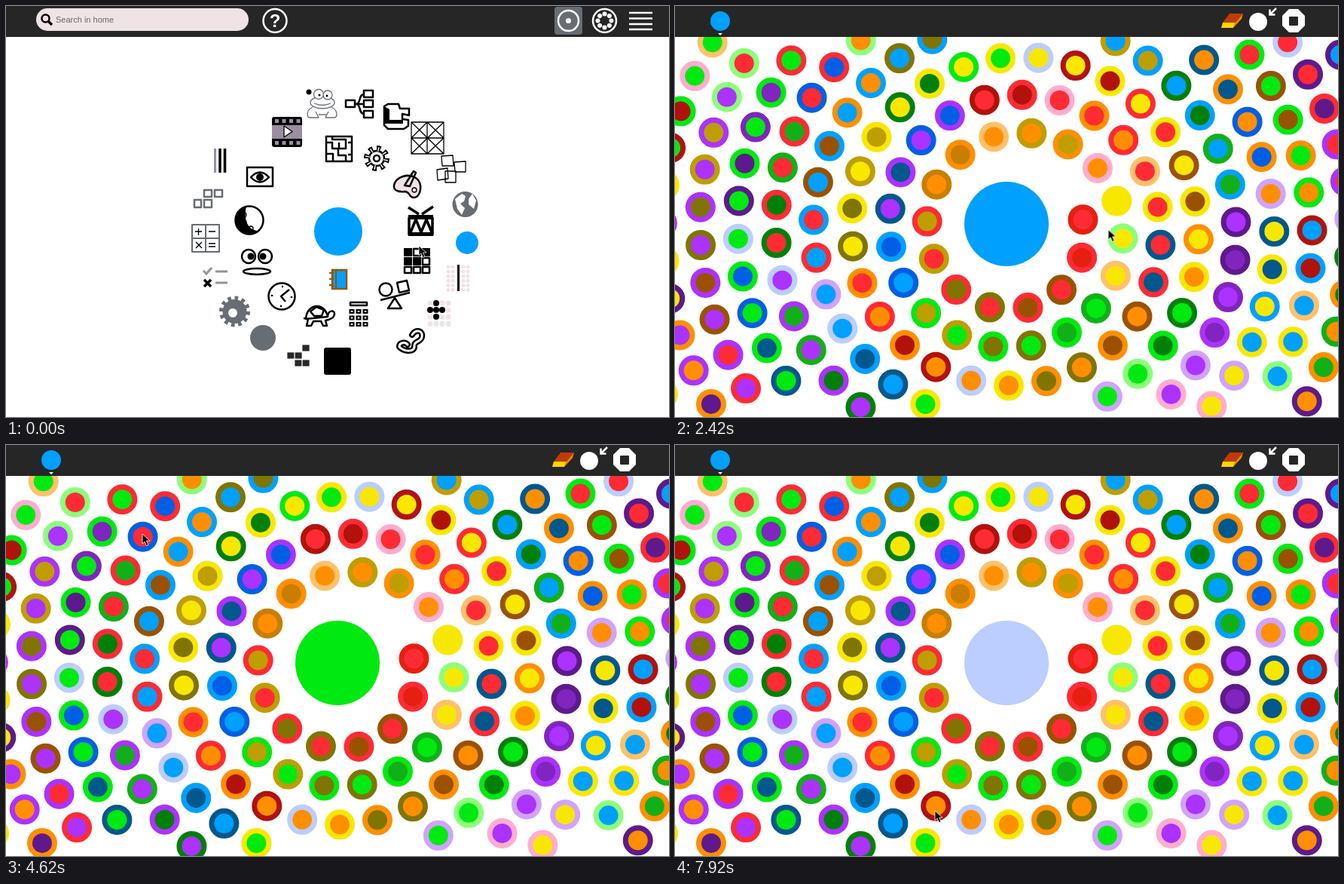
An HTML page without scripts for the animation above (8000 ms loop, 880 by 545 pixels).

```html
<!DOCTYPE html>
<html lang="en">
<head>
<meta charset="utf-8">
<title>Colour spiral</title>
<style>
html, body { margin: 0; width: 100%; height: 100%; overflow: hidden; background: #fff; }
body { position: relative; font-family: "Liberation Sans", Arial, sans-serif; }
svg, .dots { position: absolute; left: 0; top: 0; width: 880px; height: 545px; overflow: hidden; }
p { margin: 0; }

/* Dots sit at equal steps along a spiral */
.dots i {
  --n: calc(var(--s) + var(--k, 0));
  --u: sqrt(122.9 + 12.467 * var(--n) + .00012 * var(--n) * var(--n));
  --a: calc((var(--u) - 11.25) * 1rad);
  --r: calc(var(--u) * 8px + 2px);
  position: absolute; left: 452px; top: 298px;
  width: 26px; height: 26px; margin: -20px;
  border-width: 7px; border-style: solid; border-radius: 50%;
  translate: calc(var(--r) * cos(var(--a))) calc(var(--r) * sin(var(--a)));
}
i:nth-child(2) { --k: 1 }  i:nth-child(3) { --k: 2 }  i:nth-child(4) { --k: 3 }
i:nth-child(5) { --k: 4 }  i:nth-child(6) { --k: 5 }  i:nth-child(7) { --k: 6 }
i:nth-child(8) { --k: 7 }  i:nth-child(9) { --k: 8 }  i:nth-child(10) { --k: 9 }
i:nth-child(11) { --k: 10 } i:nth-child(12) { --k: 11 } i:nth-child(13) { --k: 12 }

/* Upper case: ring, lower case: middle */
.R { border-color: #ff2b34 } .r { background: #ff2b34 }
.M { border-color: #b2120c } .m { background: #b2120c }
.E { border-color: #e62010 } .e { background: #e62010 }
.O { border-color: #ff8f00 } .o { background: #ff8f00 }
.N { border-color: #9a5200 } .n { background: #9a5200 }
.C { border-color: #c97e00 } .c { background: #c97e00 }
.T { border-color: #ffc169 }
.Y { border-color: #f8e800 } .y { background: #f8e800 }
.V { border-color: #807500 } .v { background: #807500 }
.B { border-color: #be9e00 } .b { background: #be9e00 }
.G { border-color: #00ea11 } .g { background: #00ea11 }
.D { border-color: #008009 } .d { background: #008009 }
.H { border-color: #12b018 } .h { background: #12b018 }
.L { border-color: #8bff7a }
.S { border-color: #00a0ff } .s { background: #00a0ff }
.U { border-color: #005fe4 } .u { background: #005fe4 }
.K { border-color: #00588c } .k { background: #00588c }
.P { border-color: #bccdff }
.A { border-color: #ac32ff } .a { background: #ac32ff }
.X { border-color: #5e1a8c } .x { background: #5e1a8c }
.W { border-color: #8224c0 } .w { background: #8224c0 }
.F { border-color: #d1a3ff }
.I { border-color: #ffadce }

.home, .board, .blank, .wait, .pick, .ptr { animation: 8s step-end infinite; }
.home { animation-name: home; }
.board { animation-name: board; }
.blank { animation-name: blank; }
.wait { animation-name: wait; }
.pick { animation-name: pick; }
.ptr { animation-name: ptr; }
.move { animation: move 8s ease-in-out infinite; }
@keyframes home { 0% { visibility: visible } 12.37%, to { visibility: hidden } }
@keyframes board { 0% { visibility: hidden } 19.24%, to { visibility: visible } }
@keyframes blank { 0% { visibility: visible } 19.24%, to { visibility: hidden } }
@keyframes wait { 0% { visibility: visible } 24.7%, to { visibility: hidden } }
@keyframes ptr { 0% { visibility: visible } 12.37% { visibility: hidden } 24.7%, to { visibility: visible } }
@keyframes pick {
  0% { fill: #00a0ff } 41.2% { fill: #e62010 } 57.7% { fill: #00ea11 }
  72.8% { fill: #00a0ff } 89.3%, to { fill: #bccdff }
}
@keyframes move {
  0% { transform: translate(548px, 318px) }
  9%, 12.4% { transform: translate(613px, 314px) }
  12.5%, 24.7% { transform: translate(620px, 315px) }
  35%, 38% { transform: translate(541px, 283px) }
  41.25% { transform: translate(556px, 224px) }
  53%, 55% { transform: translate(129px, 114px) }
  57.75% { transform: translate(181px, 118px) }
  67%, 70% { transform: translate(184px, 284px) }
  72.9% { transform: translate(188px, 324px) }
  84%, 88% { transform: translate(222px, 428px) }
  98%, to { transform: translate(345px, 485px) }
}

.ink { fill: none; stroke: #000; stroke-width: 2.5; stroke-linejoin: round; }
.thin { stroke-width: 1.3; }
.grey { stroke: #686d73; }
.solid { fill: #000; stroke: none; }
.light { fill: none; stroke: #fff; stroke-width: 2.5; }
</style>
</head>
<body>

<div class="dots board">
<p style="--s:0"><i class="E r"></i><i class="R e"></i><i class="N r"></i><i class="R n"></i><i class="V r"></i><i class="R v"></i><i class="B r"></i><i class="R b"></i><i class="C o"></i><i class="O c"></i><i class="T o"></i><i class="B o"></i>
<p style="--s:12"><i class="O b"></i><i class="I o"></i><i class="Y y"></i><i class="L y"></i><i class="T y"></i><i class="H g"></i><i class="G h"></i><i class="V g"></i><i class="G v"></i><i class="B g"></i><i class="G b"></i><i class="U s"></i>
<p style="--s:24"><i class="S u"></i><i class="K a"></i><i class="A k"></i><i class="U a"></i><i class="A u"></i><i class="M r"></i><i class="R m"></i><i class="I r"></i><i class="O r"></i><i class="R o"></i><i class="T r"></i><i class="Y r"></i>
<p style="--s:36"><i class="K r"></i><i class="R k"></i><i class="N o"></i><i class="O n"></i><i class="V o"></i><i class="O v"></i><i class="Y o"></i><i class="P o"></i><i class="M o"></i><i class="O m"></i><i class="R o"></i><i class="O r"></i>
<p style="--s:48"><i class="V y"></i><i class="Y v"></i><i class="B y"></i><i class="Y b"></i><i class="D y"></i><i class="Y d"></i><i class="G y"></i><i class="Y g"></i><i class="P y"></i><i class="M y"></i><i class="Y m"></i><i class="R y"></i>
<p style="--s:60"><i class="Y r"></i><i class="N y"></i><i class="Y n"></i><i class="O y"></i><i class="Y o"></i><i class="D g"></i><i class="G d"></i><i class="L g"></i><i class="F g"></i>
<p style="--s:73"><i class="Y g"></i><i class="K s"></i><i class="S k"></i><i class="P s"></i><i class="F s"></i><i class="R s"></i><i class="S r"></i><i class="N s"></i><i class="S n"></i><i class="O s"></i><i class="S o"></i><i class="V s"></i><i class="S v"></i>
<p style="--s:90"><i class="B s"></i><i class="S b"></i><i class="D s"></i><i class="S d"></i><i class="H s"></i><i class="S h"></i><i class="X a"></i><i class="X w"></i><i class="W a"></i><i class="A w"></i><i class="F a"></i><i class="I a"></i>
<p style="--s:110"><i class="D a"></i><i class="A d"></i><i class="H a"></i><i class="A h"></i><i class="P a"></i><i class="D r"></i><i class="R d"></i><i class="H r"></i><i class="R h"></i><i class="U r"></i><i class="R u"></i><i class="L o"></i>
<p style="--s:131"><i class="K o"></i><i class="O k"></i><i class="U o"></i><i class="O u"></i><i class="F o"></i><i class="K y"></i><i class="Y k"></i><i class="S y"></i><i class="Y s"></i><i class="F y"></i><i class="I y"></i>
<p style="--s:154"><i class="K g"></i><i class="G k"></i><i class="U g"></i><i class="G u"></i><i class="P g"></i><i class="X g"></i><i class="G x"></i><i class="W g"></i><i class="G w"></i><i class="R g"></i>
<p style="--s:177"><i class="G r"></i><i class="N g"></i><i class="G n"></i><i class="O g"></i><i class="G o"></i><i class="M s"></i><i class="S m"></i><i class="T s"></i><i class="Y s"></i><i class="L s"></i>
<p style="--s:203"><i class="R a"></i><i class="A r"></i><i class="N a"></i><i class="A n"></i><i class="V a"></i><i class="A v"></i><i class="B a"></i><i class="A b"></i><i class="L a"></i><i class="L r"></i>
<p style="--s:229"><i class="P r"></i><i class="X r"></i><i class="R x"></i><i class="A r"></i><i class="A r"></i><i class="F r"></i><i class="D s"></i><i class="O d"></i><i class="H o"></i><i class="O h"></i><i class="X o"></i>
<p style="--s:258"><i class="O x"></i><i class="A o"></i><i class="O a"></i><i class="X y"></i><i class="Y a"></i><i class="A y"></i><i class="Y a"></i><i class="M g"></i><i class="G m"></i><i class="I g"></i><i class="T g"></i>
<p style="--s:288"><i class="X s"></i>
<p style="--s:320"><i class="Y a"></i>
</div>

<svg viewBox="0 0 880 545">
  <rect width="880" height="41" fill="#262626"/>
  <circle class="blank" cx="60" cy="20" r="13" fill="#fff"/>
  <g class="board">
    <circle cx="60" cy="20" r="13" fill="#00a0ff"/>
    <path d="M57 36h6l-3 3z" fill="#fff"/>
    <circle class="pick" cx="440" cy="289" r="56"/>
  </g>
  <path d="M736 10h18l-10 12h-17z" fill="#c23a08"/>
  <path d="M727 22h17l-3 7h-16z" fill="#f8d800"/>
  <path d="M744 22l10-12-2 7-11 12z" fill="#f08a00"/>
  <circle cx="774" cy="21" r="12" fill="#fff"/>
  <path class="light" stroke-width="2" d="M798 3l-8 8M789.500 4.500v7h7"/>
  <path d="M815 4h12l9 9v13l-9 9h-12l-9-9V13z" fill="#fff"/>
  <rect x="815" y="14" width="12" height="12" rx="1" fill="#262626"/>
  <g class="blank">
    <rect x="-10" y="535" width="301" height="20" rx="5" fill="#20272a" style="filter:drop-shadow(0 0 7px #ddddc8)"/>
    <text x="-2" y="549" font-size="11" fill="#aeb4b6">En attente du serveur…</text>
  </g>
  <g class="wait">
    <path d="M636 331l-13-13M622 331v-14h14" fill="none" stroke="#fff" stroke-width="8"/>
    <path d="M637 331.500L623 318M622 332v-15h15" fill="none" stroke="#000" stroke-width="5"/>
  </g>
</svg>

<svg class="home" viewBox="0 0 880 545">
  <rect width="880" height="545" fill="#fff"/>
  <rect width="880" height="41" fill="#262626"/>

  <!-- Toolbar -->
  <rect x="40" y="3" width="282" height="30" rx="15" fill="#f0e3e6"/>
  <g class="ink"><circle cx="52.500" cy="16.500" r="5"/><path stroke-width="3.500" d="M56 20l5 5"/></g>
  <text x="66" y="22" font-size="11" fill="#666">Search in home</text>
  <circle class="light" cx="357" cy="19.500" r="15.500"/>
  <text x="357" y="28" font-size="24" font-weight="bold" fill="#fff" text-anchor="middle">?</text>
  <rect x="728" y="1" width="37" height="37" rx="4" fill="#686d73"/>
  <circle class="light" cx="746.500" cy="19.500" r="13.500"/>
  <circle cx="746.500" cy="19.500" r="3.500" fill="#fff"/>
  <circle class="light" cx="794.500" cy="19.500" r="15.500"/>
  <circle cx="794.500" cy="19.500" r="9" fill="none" stroke="#fff" stroke-width="6" stroke-linecap="round" pathLength="80" stroke-dasharray=".1 9.9"/>
  <path class="light" d="M827 9h31M827 16.500h31M827 24h31M827 31h31"/>

  <!-- Middle -->
  <circle cx="441" cy="299" r="32" fill="#00a0ff"/>
  <path d="M433 350h19v25h-19z" fill="#00a0ff" stroke="#9a5200" stroke-width="2.500"/>
  <path d="M438 350v25M429 354h6M429 362h6M429 370h6" stroke="#9a5200" stroke-width="2"/>

  <!-- Inner ring -->
  <path class="ink" d="M425 173h34v33h-34zM425 181h8v8h9v-8M433 173v4h18v12h-10v9h10v8M459 181h-5M425 196h9v10M459 197h-5"/>
  <circle class="ink" cx="492" cy="202" r="13.500" style="stroke-width:7" pathLength="80" stroke-dasharray="5 5"/>
  <circle class="ink" cx="492" cy="202" r="10" style="fill:#fff"/>
  <circle cx="492" cy="202" r="12" fill="none" stroke="#fff" stroke-width="6" pathLength="80" stroke-dasharray="1.500 8.500" stroke-dashoffset="-1.750"/>
  <circle class="ink" cx="492" cy="202" r="4"/>
  <path class="ink" style="fill:#f0e3e6" d="M515 238c2-11 18-17 29-10 10 7 7 26-3 26-7 0-4-8-12-8-7 1-15-1-14-8z"/>
  <path class="ink" d="M529 238l12-19 3 2-8 18z"/><circle class="ink thin" cx="542" cy="244" r="3"/>
  <path class="ink" style="stroke-width:3.500" d="M535 281h31v22h-31zM537 300l7-17 7 17 7-17 7 17M548 276l-14-9M552 276l15-10"/>
  <path class="solid" d="M534 277h33v6h-33zM534 300h33v5h-33z"/>
  <path class="solid" d="M528 321h11v11h-11zM552 321h11v11h-11zM528 333h11v11h-11zM540 333h11v11h-11z"/>
  <path class="ink" d="M541 322h9v9h-9zM553 334h9v9h-9zM529 346h9v8h-9zM541 346h9v8h-9zM553 346h9v8h-9z"/>
  <g class="ink"><circle cx="504" cy="376" r="8.500"/><path d="M519 367l13-3 3 13-13 3zM497 390l39-10M516 387l9 14h-18z"/></g>
  <path class="ink" d="M457 393h22v4h-22z"/>
  <path class="ink" d="M459 402v24M468 402v24M477 402v24" style="stroke-width:7" stroke-dasharray="6 2.500"/>
  <path d="M459 404v20M468 404v20M477 404v20" stroke="#fff" stroke-width="2.500" stroke-dasharray="2 6.500"/>
  <path class="ink" d="M398 414c2-20 25-22 29-2l-29 3zM427 411c1-8 9-8 9-3s-6 8-12 9l2 7h-5l-3-6h-10l-3 6h-6l2-9-6-1M404 405l8-6 10 4-3 8h-10z"/>
  <g class="ink"><circle cx="366" cy="385" r="17.500"/><path d="M376 376l-11 9 6 7"/><circle cx="366" cy="385" r="13" pathLength="40" stroke-dasharray="1 9"/></g>
  <g class="ink"><circle cx="322" cy="332" r="9"/><circle cx="344" cy="332" r="9"/><ellipse cx="333" cy="352" rx="18" ry="4"/></g>
  <g class="solid"><circle cx="325" cy="332" r="4.500"/><circle cx="341" cy="332" r="4.500"/></g>
  <circle class="ink" cx="323" cy="284" r="18.500"/>
  <path class="solid" d="M319 266c-18 3-21 31 2 37 7 1 12-1 16-5-13 1-23-11-18-32z"/>
  <g class="ink thin"><circle cx="315" cy="277" r="4"/><circle cx="316" cy="287" r="3"/><circle cx="325" cy="295" r="3"/></g>
  <path class="ink" d="M320 214h34v25h-34zM325 227q12-13 24 0-12 13-24 0z"/><circle class="solid" cx="337" cy="227" r="5"/>

  <!-- Outer ring -->
  <g class="ink thin grey"><ellipse cx="420" cy="128" rx="16" ry="8" fill="#fff"/><circle cx="415" cy="117" r="6.500" fill="#fff"/><circle cx="427" cy="118" r="6" fill="#fff"/><path d="M407 134c-9 4-8 14-4 14h12l-4-8M432 134c9 4 8 14 4 14h-12l4-8M415 144h10M409 129q11 5 22 0"/></g>
  <g class="solid"><circle cx="402" cy="114" r="3.500"/><circle cx="416" cy="118" r="1.500"/><circle cx="426" cy="119" r="1.500"/></g>
  <path class="ink" d="M451 125h12v9h-12zM475 112h12v9h-12zM475 125h12v9h-12zM475 139h12v9h-12zM463 130h12M465 130c6 0 3-13 10-13M465 130c6 0 3 13 10 13"/>
  <path class="ink" d="M502 133l5-3h14l2 6h12v9l-9-2v7l8 1v8l-6 4h-21l-5-5z"/><path class="solid" d="M502 133l7 4v14h18v5h-25z"/>
  <path class="ink thin" d="M538 154h43v42h-43zM538 196l43-42M538 154l43 42M559 154l22 21-22 21-21-21zM559 154v42M538 175h43"/>
  <g class="ink thin" style="fill:#fff"><path d="M578 199l15-1 1 14h-15zM583 219h14v15h-14zM572 217l14-2 1 14-14 2zM595 207l15-1v14h-14z"/></g>
  <circle cx="609.500" cy="263" r="17" fill="#686d73"/>
  <path d="M596 256l9-7 5 3-2 7-5 3 6 6-4 9-6-8zM614 256l5-7 5 9-3 11-7-6z" fill="#fff"/>
  <circle cx="612" cy="314" r="15" fill="#00a0ff"/>
  <path d="M587 346v31M593 346v31M607 346v31M613 346v31" stroke="#f0e3e6" stroke-width="5" stroke-linecap="round" stroke-dasharray=".1 6"/>
  <path class="solid" d="M599 343h3v35h-3z"/>
  <path d="M563 394v29M571 394v29M579 394v29M587 394v29" stroke="#f0e3e6" stroke-width="7" stroke-linecap="round" stroke-dasharray=".1 9"/>
  <g class="solid"><circle cx="571" cy="394" r="4"/><circle cx="563" cy="403" r="4"/><circle cx="571" cy="403" r="4"/><circle cx="579" cy="403" r="4"/><circle cx="571" cy="412" r="4"/></g>
  <path class="ink" style="stroke-width:8;stroke-linecap:round" d="M539 436c5-8 15-6 13 3-1 7-11 5-10 12 1 8-13 8-20 1 0-6 8-7 11-3"/>
  <path class="ink" style="stroke:#fff;stroke-width:3;stroke-linecap:round" d="M539 436c5-8 15-6 13 3-1 7-11 5-10 12 1 8-13 8-20 1 0-6 8-7 11-3"/>
  <rect x="422" y="453" width="36" height="36" rx="3"/>
  <path d="M393 449h10v9h-10zM373 459h10v9h-10zM383 459h10v9h-10zM383 469h10v9h-10zM393 469h10v9h-10z" fill="#282828" stroke="#fff" stroke-width=".8"/>
  <circle cx="341" cy="440" r="17" fill="#686d73"/>
  <circle cx="303.500" cy="405" r="16" fill="#686d73"/>
  <circle cx="303.500" cy="405" r="17" fill="none" stroke="#686d73" stroke-width="7" pathLength="60" stroke-dasharray="2.500 2.500"/>
  <circle cx="301" cy="407" r="6" fill="#fff"/>
  <path d="M262 351l4 4 7-8M278 352h16M278 367h16" fill="none" stroke="#9a8f9f" stroke-width="3"/>
  <path class="ink" style="stroke-width:3.500" d="M263 363l9 9M272 363l-9 9"/>
  <path class="ink thin grey" style="stroke-width:2" d="M247 290h36v36h-36zM265 290v36M247 308h36"/>
  <path class="ink thin" d="M251 299h9M255.500 295v9M269 299h9M252 313l8 8M260 313l-8 8M269 315h9M269 319h9"/>
  <path class="ink grey" d="M263 244h10v9h-10zM277 244h10v9h-10zM250 257h9v10h-9zM263 257h10v10h-10z"/>
  <path d="M277.500 189v32" stroke="#9a8f9f" stroke-width="3"/><path d="M284 189v32M290.500 189v32" stroke="#000" stroke-width="3.500"/>
  <rect x="353" y="147" width="40" height="40" rx="3"/>
  <path d="M353 158h40v18h-40z" fill="#9a8f9f"/>
  <path d="M357 152.500h34M357 181.500h34" stroke="#9a8f9f" stroke-width="5" stroke-dasharray="5 4.500"/>
  <path class="ink thin" style="fill:#fff" d="M369 159v15l11-7.500z"/>
</svg>

<svg class="ptr" viewBox="0 0 880 545">
  <path class="move" d="M0 0v13l3-3 2.500 5.500 2.500-1-2.500-5.500h4.500z" stroke="#fff" stroke-width=".8"/>
</svg>
</body>
</html>
```
